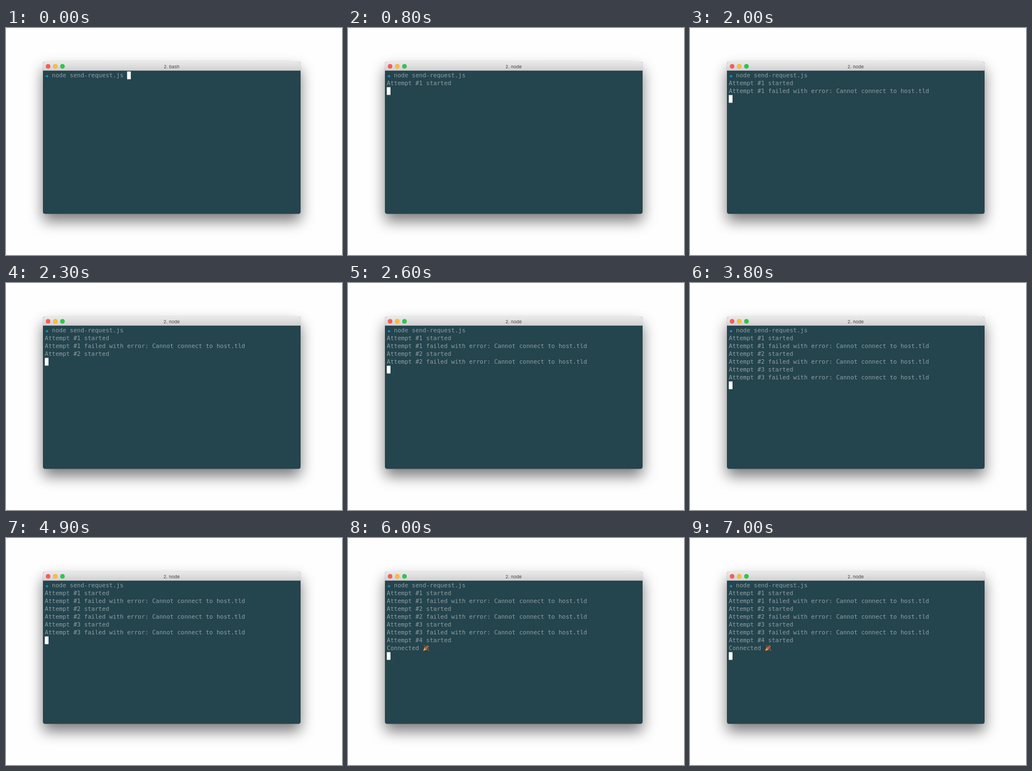
These frames come from a looping animation (600 px wide and 405 px high, 7100 ms). An HTML page:

```html
<!DOCTYPE html>
<html lang="en">
<head>
<meta charset="utf-8">
<title>Terminal</title>
<style>
  html, body { margin: 0; width: 100%; height: 100%; overflow: hidden; background: #fefefe; }
  svg { display: block; width: 100%; height: 100%; }
  .mono { font: 10.61px "DejaVu Sans Mono", monospace; fill: #8f9f9f; white-space: pre; }
  .title { font: 8.1px Inter, sans-serif; fill: #444; text-anchor: middle; }
</style>
</head>
<body>
<svg viewBox="0 0 600 405" xmlns="http://www.w3.org/2000/svg">
  <defs>
    <linearGradient id="bar" x1="0" y1="0" x2="0" y2="1">
      <stop offset="0" stop-color="#ebeaeb"/>
      <stop offset="1" stop-color="#d1d0d1"/>
    </linearGradient>
    <filter id="blur" x="-20%" y="-30%" width="140%" height="160%">
      <feGaussianBlur stdDeviation="13"/>
    </filter>
  </defs>

  <rect width="600" height="405" fill="#fefefe"/>
  <rect x="66" y="73" width="460" height="271.5" rx="4" fill="#000" opacity=".52" filter="url(#blur)"/>
  <rect x="65.7" y="59.8" width="460.6" height="272.2" rx="4.3" fill="#000" opacity=".16"/>

  <rect x="66" y="60" width="460" height="271.5" rx="4" fill="#24444e"/>
  <path d="M66 76V64a4 4 0 0 1 4-4H522a4 4 0 0 1 4 4V76Z" fill="url(#bar)"/>
  <path d="M66 75.8H526" stroke="#b4b4b4" stroke-width=".5"/>
  <g stroke-width=".5">
    <circle cx="75.2" cy="68.4" r="3.8" fill="#fc5b57" stroke="#e2463f"/>
    <circle cx="88" cy="68.4" r="3.8" fill="#fdbc40" stroke="#dfa023"/>
    <circle cx="100.8" cy="68.4" r="3.8" fill="#2fc84a" stroke="#1dad2b"/>
  </g>
  <text id="title" class="title" x="295.8" y="71.5"></text>

  <path d="M70.2 86H74.2M72.5 84 74.8 86 72.5 88" fill="none" stroke="#259bd0" stroke-width="1.2"/>
  <g id="rows"></g>

  <g id="popper">
    <path d="M134.2 201.6 137 194.2 141.6 198.8Z" fill="#f2b13c"/>
    <path d="M135.3 198.8 137.2 200.5M136.3 196.2 139.6 199.6" stroke="#d9772b" stroke-width=".9"/>
    <ellipse cx="139.3" cy="196.5" rx="3.2" ry="1.3" transform="rotate(45 139.3 196.5)" fill="#b5532f"/>
    <path d="M139 195.5Q140.6 193.7 139.4 191.8" fill="none" stroke="#e4574e" stroke-width="1.2"/>
    <path d="M140.4 196.2Q142 193.7 144 193.4" fill="none" stroke="#f0d9a0" stroke-width="1"/>
    <path d="M141 197.2Q142.7 196.4 144 197.5" fill="none" stroke="#e4574e" stroke-width="1"/>
    <circle cx="136.3" cy="192.3" r=".7" fill="#e36a72"/>
    <circle cx="142.2" cy="192" r=".7" fill="#5aa9dd"/>
    <circle cx="143.7" cy="200.2" r=".7" fill="#f0c04a"/>
  </g>
  <rect id="cursor" width="6.6" height="13.8" fill="#fff"/>
</svg>
<script>
const LOOP = 7100, LEFT = 69.3, TOP = 77.6, STEP = 14, CHAR = 6.39;
const ENTER = 300, LAUNCH = 800;
const COMMAND = "  node send-request.js";
const $ = id => document.getElementById(id);

const started = n => `Attempt #${n} started`;
const failed = n => `Attempt #${n} failed with error: Cannot connect to host.tld`;

// Each row: [time it is printed, text]
const lines = [[0, COMMAND]];
[[800, 1000], [2300, 2500], [3600, 3800]].forEach(([start, fail], i) =>
  lines.push([start, started(i + 1)], [fail, failed(i + 1)]));
lines.push([5200, started(4)], [5600, "Connected"]);

const rows = lines.map(([, text], i) => {
  const row = document.createElementNS("http://www.w3.org/2000/svg", "text");
  row.setAttribute("class", "mono");
  row.setAttribute("x", LEFT);
  row.setAttribute("y", TOP + 10.7 + i * STEP);
  row.textContent = text;
  $("rows").append(row);
  return row;
});

const show = (el, on) => el.setAttribute("visibility", on ? "visible" : "hidden");

function draw(t) {
  const count = lines.filter(([at]) => t >= at).length;
  const typing = t < ENTER;
  rows.forEach((row, i) => show(row, i < count));
  show($("popper"), count === lines.length);
  $("title").textContent = t < LAUNCH ? "2. bash" : "2. node";
  $("cursor").setAttribute("x", LEFT + (typing ? (COMMAND.length + 1) * CHAR : 0));
  $("cursor").setAttribute("y", TOP + (typing ? 0 : count * STEP));
}

const begin = performance.now();
function tick() {
  draw((performance.now() - begin) % LOOP);
  requestAnimationFrame(tick);
}
tick();
</script>
</body>
</html>
```
